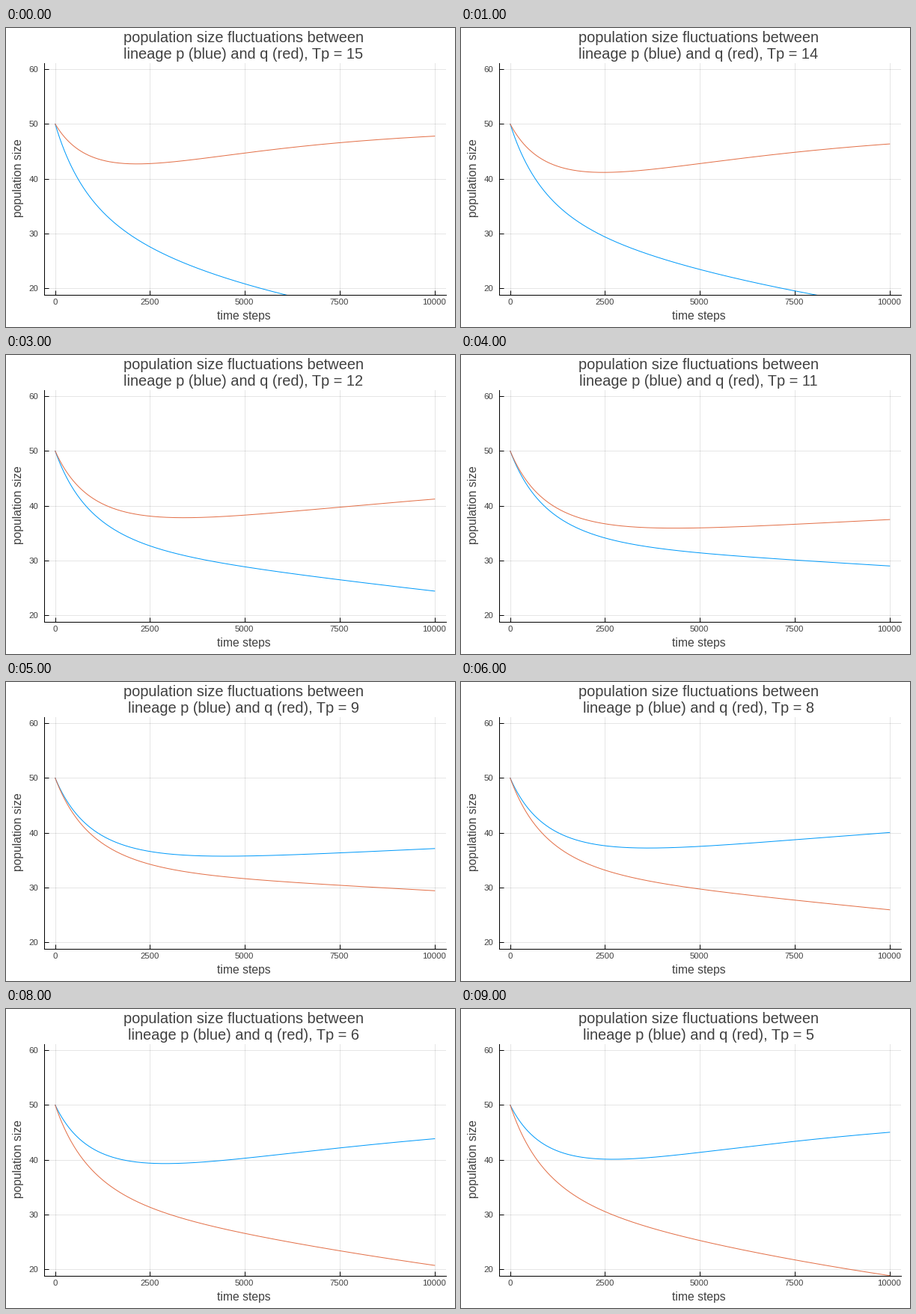
These frames come from a looping animation (600 px wide and 400 px high, 10000 ms). A matplotlib script:

```python
import numpy as np
import matplotlib.pyplot as plt
from matplotlib.animation import FuncAnimation

W, H, DPI = 600, 400, 100
PX = 72 / DPI  # points per pixel
STEPS = 10000
K = 50.0       # carrying capacity
RATE = 7e-4    # growth per time step
TQ = 10.0
TP_VALUES = [tp for tp in range(15, 4, -1) if tp != 10]

BLUE, RED, INK = "#009afa", "#e36f47", "#404040"
LEFT, RIGHT, TOP, BOTTOM = 50.5, 588.0, 46.5, 356.5


def simulate(tp):
    """Two competing lineages whose pressure depends on their weighted share."""
    p = q = K
    sizes = np.empty((STEPS + 1, 2))
    for i in range(STEPS + 1):
        sizes[i] = p, q
        wp, wq = (20 - tp) * p, TQ * q
        share = wq / (wp + wq)
        dp = RATE * p * (1 - (p + share * q) / K)
        dq = RATE * q * (1 - (q + (1 - share) * p) / K)
        p, q = p + dp, q + dq
    return sizes[::20]


runs = [simulate(tp) for tp in TP_VALUES]
time = np.arange(0, STEPS + 1, 20)

plt.rcParams["font.family"] = "Liberation Sans"
fig = plt.figure(figsize=(W / DPI, H / DPI), dpi=DPI, facecolor="white")
ax = fig.add_axes([LEFT / W, 1 - BOTTOM / H,
                   (RIGHT - LEFT) / W, (BOTTOM - TOP) / H])
ax.set_xlim(-300, 10300)
ax.set_ylim(18.8, 61.2)
ax.set_xticks(range(0, 10001, 2500))
ax.set_yticks(range(20, 61, 10))
ax.tick_params(direction="in", length=6 * PX, width=PX,
               labelbottom=False, labelleft=False)
ax.set_axisbelow(True)
ax.grid(color="black", alpha=0.1, linewidth=PX)
for side in ("top", "right"):
    ax.spines[side].set_visible(False)
for side in ("left", "bottom"):
    ax.spines[side].set_linewidth(PX)


def label(x, y, text, size, ha="center", **kw):
    """Text with its baseline at pixel (x, y), measured from the top left."""
    return fig.text(x / W, 1 - y / H, text, fontsize=size * PX, color=INK,
                    ha=ha, va="baseline", **kw)


def x_pixel(v):
    return LEFT + (v + 300) / 10600 * (RIGHT - LEFT)


def y_pixel(v):
    return BOTTOM - (v - 18.8) / 42.4 * (BOTTOM - TOP)


for v in ax.get_xticks():
    label(x_pixel(v) - 0.5, 370, f"{v:.0f}", 11.4)
for v in ax.get_yticks():
    label(43.5, round(y_pixel(v) + 4), f"{v:.0f}", 11.4, ha="right")

label(317.3, 19, "population size fluctuations between", 20)
subtitle = label(317.3, 41, "", 20)
label(318, 390, "time steps", 15.7)
label(21, 201, "population size", 15.7, rotation=90, rotation_mode="anchor")

line_p, = ax.plot([], [], color=BLUE, linewidth=PX)
line_q, = ax.plot([], [], color=RED, linewidth=PX)


def draw(i):
    line_p.set_data(time, runs[i][:, 0])
    line_q.set_data(time, runs[i][:, 1])
    subtitle.set_text(f"lineage p (blue) and q (red), Tp = {TP_VALUES[i]}")
    return line_p, line_q, subtitle


anim = FuncAnimation(fig, draw, frames=len(TP_VALUES), interval=1000,
                     repeat=True, repeat_delay=0)
plt.show()
```
